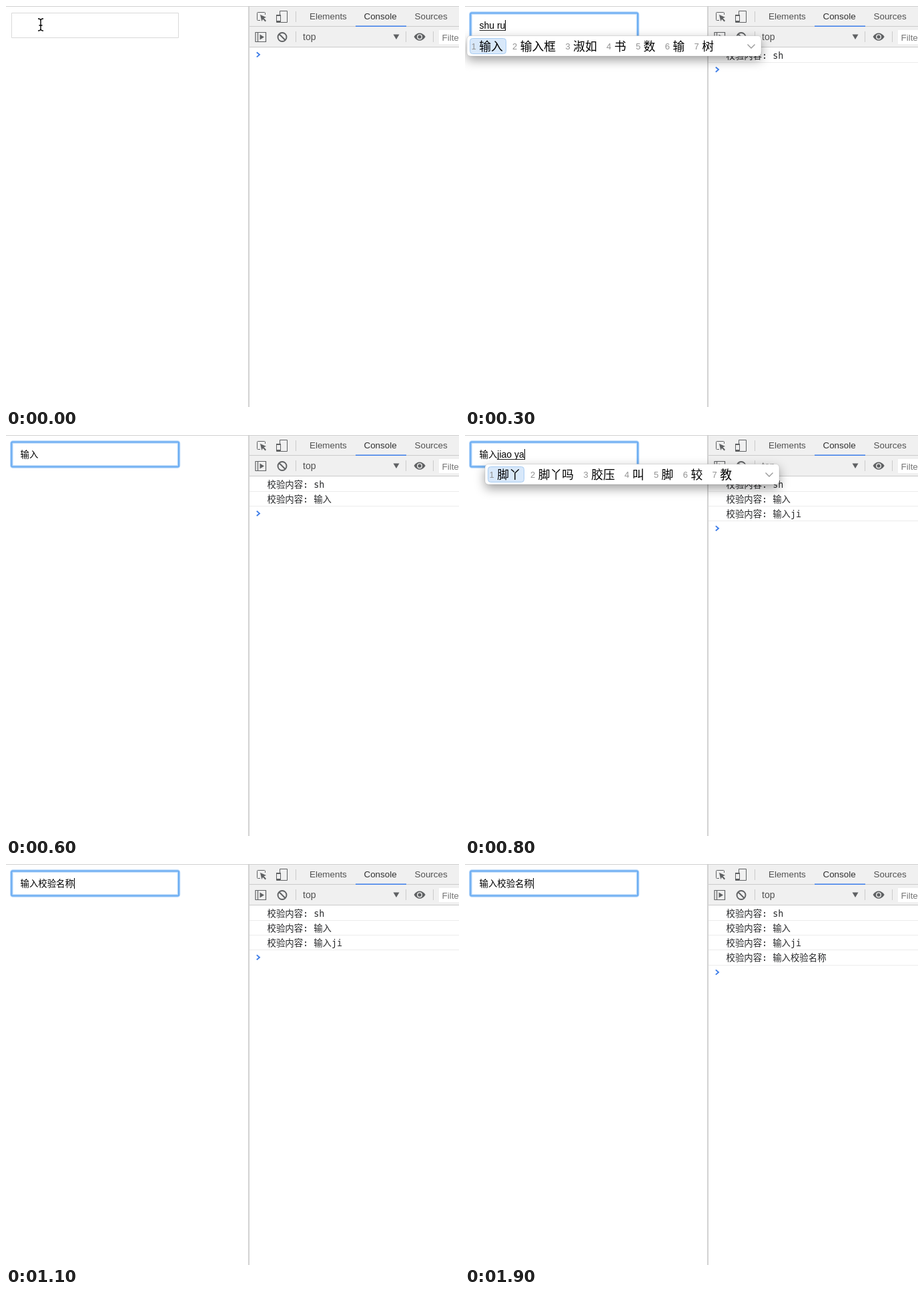
Recreate the animation shown at these times as an HTML page with a canvas. Size 679x600 px, loop 2000 ms.

```html
<!DOCTYPE html>
<html lang="zh-CN">
<head>
<meta charset="utf-8">
<style>
html, body { margin: 0; width: 100%; height: 100%; overflow: hidden; background: #fff; }
canvas { display: block; width: 679px; height: 600px; }
</style>
</head>
<body>
<canvas id="stage" width="679" height="600"></canvas>
<script>
const ctx = document.getElementById('stage').getContext('2d');
const CJK = '"Noto Sans CJK SC", "Noto Sans CJK", sans-serif';
const SANS = '"Liberation Sans", ' + CJK;
const MONO = '"DejaVu Sans Mono", ' + CJK;
const STEP = 100, LOOP = 2000;

const SHU_RU = ['输入', '输入框', '淑如', '书', '数', '输', '树'];
const JIAO_YA = ['脚丫', '脚丫吗', '胶压', '叫', '脚', '较', '教'];
const NAME = ['校验名称', '校验', '检验', '叫', '脚', '较', '教'];
const LOGS = ['sh', '输入', '输入ji', '输入校验名称'];

// Each change holds until the next one: committed text, pinyin, candidates, log count, caret.
const states = [
  { at: 0, text: '', logs: 0, mouse: [52, 28] },
  { at: 100, focus: true, caret: true },
  { at: 200, pinyin: 'sh', words: ['是', '上', '时', '使', '事', '十', '说'], mouse: null },
  { at: 300, pinyin: 'shu ru', words: SHU_RU, logs: 1 },
  { at: 500, text: '输入', pinyin: '' },
  { at: 600, logs: 2, caret: false },
  { at: 700, pinyin: 'ji', words: ['及', '级', '几', '机', '即', '记', '急'], caret: true },
  { at: 800, pinyin: 'jiao ya', words: JIAO_YA, logs: 3 },
  { at: 900, pinyin: 'jiao yan ming', words: NAME },
  { at: 1000, pinyin: 'jiao yan ming cheng' },
  { at: 1100, text: '输入校验名称', pinyin: '' },
  { at: 1200, mouse: [432, 319] },
  { at: 1300, mouse: [440, 270] },
  { at: 1400, mouse: [455, 196], logs: 4 },
  { at: 1500, mouse: [465, 156], caret: false },
  { at: 1700, mouse: [500, 142] },
  { at: 1800, mouse: [528, 133] },
  { at: 1900, mouse: null, caret: true }
];

function stateAt(time) {
  return Object.assign({}, ...states.filter(s => s.at <= time));
}

function rect(x, y, w, h, color) {
  ctx.fillStyle = color;
  ctx.fillRect(x, y, w, h);
}

function text(str, x, y, font, color) {
  ctx.font = font;
  ctx.fillStyle = color;
  ctx.fillText(str, x, y);
  return x + ctx.measureText(str).width;
}

function stroke(path, color, width = 1) {
  ctx.strokeStyle = color;
  ctx.lineWidth = width;
  ctx.stroke(new Path2D(path));
}

function fill(path, color) {
  ctx.fillStyle = color;
  ctx.fill(new Path2D(path));
}

function roundRect(x, y, w, h, r) {
  ctx.beginPath();
  ctx.roundRect(x, y, w, h, r);
}

function strokeRound(x, y, w, h, r, color, width) {
  roundRect(x, y, w, h, r);
  ctx.strokeStyle = color;
  ctx.lineWidth = width;
  ctx.stroke();
}

function drawToolbar() {
  const icon = '#5f6163', line = '#cbcbcb';
  rect(365, 1, 314, 60, '#f0f0f0');
  rect(0, 0, 679, 1, '#d0d0d0');
  rect(365, 30, 314, 1, line);
  rect(365, 61, 314, 1, line);
  rect(363, 1, 2, 599, '#d2d2d2');
  rect(524, 29.5, 76, 1.5, '#3b7de9');
  rect(434, 8, 1, 16, line);
  for (const x of [434, 599, 640]) rect(x, 38, 1, 16, line);

  const tab = '13.4px ' + SANS;
  text('Elements', 455, 20, tab, '#505050');
  text('Console', 536.5, 20, tab, '#303030');
  text('Sources', 612.5, 20, tab, '#505050');
  text('top', 445, 51, '14px ' + SANS, '#505050');
  rect(649, 36, 30, 21, '#fff');
  text('Filter', 653.5, 52, tab, '#777');

  // Inspect and device icons
  stroke('M381 21.5H377.5Q376.5 21.5 376.5 20.5V10.5Q376.5 9.5 377.5 9.5H387.5Q388.5 9.5 388.5 10.5V13', icon);
  fill('M381 13L390 17L386.5 18.2L390 22L388.5 23.5L385 19.7L383.3 23Z', icon);
  stroke('M410.5 13V7.5H421.5V24.5H412M405.5 13.5H411.5V24.5H405.5Z', icon);
  rect(405, 13, 7, 2, icon);
  rect(405, 22, 7, 2, icon);

  // Sidebar, clear, menu arrow and eye icons
  stroke('M374 39.5H389.5V53.5H374ZM377.5 39.5V53.5', icon, 1.2);
  fill('M380.5 42.5L387 46.5L380.5 50.5Z', icon);
  stroke('M420.5 46.5A6.5 6.5 0 1 1 407.5 46.5A6.5 6.5 0 1 1 420.5 46.5M409.5 42L418.5 51', icon, 1.9);
  fill('M580.5 42.5H589.5L585 50Z', icon);
  fill('M611.5 46Q615 40.5 620 40.5T628.7 46Q625 51.8 620 51.8T611.5 46Z', icon);
  strokeRound(616.7, 42.9, 6.6, 6.6, 3.3, '#f0f0f0', 1.4);
}

function drawConsole(count) {
  LOGS.slice(0, count).forEach((entry, i) => {
    text('校验内容: ' + entry, 391.5, 78.5 + 22.3 * i, '13.4px ' + MONO, '#28292b');
    rect(365, Math.round(84 + 22.2 * i), 314, 1, '#ececec');
  });
  const y = 72.8 + 22.3 * count;
  stroke(`M375.8 ${y - 3.6}L380 ${y}L375.8 ${y + 3.6}`, '#3a7be8', 1.8);
}

function drawInput({ focus, text: value, pinyin, caret }) {
  if (focus) {
    strokeRound(8.3, 10.5, 250.7, 37, 2, '#b4d6fa', 4.6);
    strokeRound(8.3, 10.5, 250.7, 37, 1.5, '#6aacf2', 2);
  } else {
    stroke('M8.5 10.5H258.5V47.5H8.5Z', '#d9d9d9');
  }
  const start = text(value, 21.5, 34, '13.4px ' + CJK, '#000');
  let end = start;
  if (pinyin) {
    end = text(pinyin, start, 34, '14px ' + SANS, '#000');
    rect(start, 36, end - start, 1, '#222');
  }
  if (caret) rect(Math.round(end), 21, 1, 16, '#000');
  return start;
}

function drawCandidates(words, left, top) {
  ctx.save();
  ctx.translate(left, top);

  ctx.save();
  ctx.shadowColor = 'rgba(0,0,0,.38)';
  ctx.shadowBlur = 16;
  ctx.shadowOffsetY = 6;
  roundRect(0, 0, 441, 30.5, 5);
  ctx.fillStyle = '#fff';
  ctx.fill();
  ctx.restore();
  strokeRound(0, 0, 441, 30.5, 5, 'rgba(0,0,0,.16)', 0.7);

  roundRect(4.5, 4, 18 * words[0].length + 18, 23, 4);
  ctx.fillStyle = '#d8e8fa';
  ctx.fill();
  strokeRound(4.5, 4, 18 * words[0].length + 18, 23, 4, '#a9cdf2', 1);

  let x = 6.5;
  words.forEach((word, i) => {
    text(i + 1, x, 20, '13px ' + SANS, '#929292');
    text(word, x + 11.7, 22, '500 17.8px ' + CJK, '#000');
    x += 17.8 * word.length + 26;
  });
  stroke('M420.5 13L426 18.5L431.5 13', '#999', 1.4);
  ctx.restore();
}

function drawMouse([x, y]) {
  const beam = `M${x - 4} ${y - 9}Q${x} ${y - 9} ${x} ${y - 6}V${y + 6}Q${x} ${y + 9} ${x - 4} ${y + 9}`
    + `M${x + 4} ${y - 9}Q${x} ${y - 9} ${x} ${y - 6}M${x} ${y + 6}Q${x} ${y + 9} ${x + 4} ${y + 9}`
    + `M${x - 2.5} ${y + 1}H${x + 2.5}`;
  stroke(beam, '#fff', 3);
  stroke(beam, '#000', 1.4);
}

function draw(time) {
  const state = stateAt(time);
  rect(0, 0, 679, 600, '#fff');
  drawToolbar();
  drawConsole(state.logs);
  const start = drawInput(state);
  // Committed Chinese text makes the line taller, which lifts the popup slightly.
  if (state.pinyin) drawCandidates(state.words, Math.round(start - 18.5), state.text ? 43.5 : 44.5);
  if (state.mouse) drawMouse(state.mouse);
}

function tick() {
  draw(Math.floor(performance.now() % LOOP / STEP) * STEP);
  requestAnimationFrame(tick);
}
tick();
</script>
</body>
</html>
```
